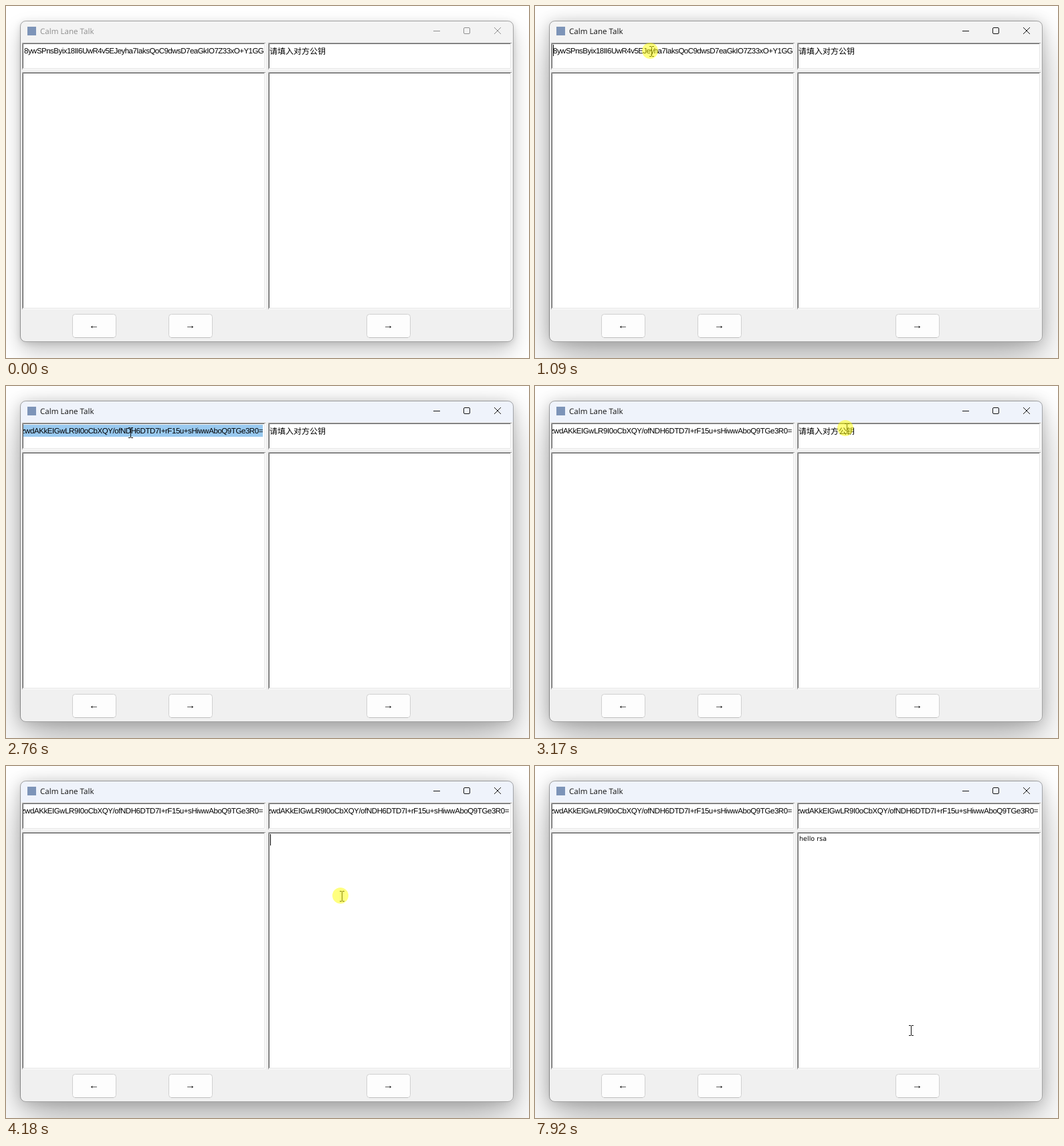
Recreate the animation shown at these times as an HTML page. Size 782x527 px, loop 7990 ms.

```html
<!DOCTYPE html>
<html lang="en">
<head>
<meta charset="utf-8">
<title>Chat window</title>
<style>
html, body { margin: 0; width: 100%; height: 100%; overflow: hidden; background: #fff; }
#stage { position: absolute; left: 0; top: 0; width: 782px; height: 527px; overflow: hidden; }
#shadow {
  position: absolute; left: 22px; top: 23px; width: 736px; height: 479px; border-radius: 8px;
  box-shadow: 0 16px 32px rgba(0,0,0,.22), 0 2px 11px rgba(0,0,0,.17);
}
#shadow.active { box-shadow: 0 32px 64px rgba(0,0,0,.28), 0 2px 21px rgba(0,0,0,.22); }
svg { position: absolute; left: 0; top: 0; }
text { white-space: pre; text-rendering: geometricPrecision; font-kerning: none; }
.key { font: 11.5px "Liberation Sans", Arial, sans-serif; }
.hint { font: 12px "Noto Sans CJK SC", "Noto Sans CJK", sans-serif; }
.typed { font: 9.6px "DejaVu Sans", Verdana, sans-serif; }
.arrow { font: 15px "Liberation Sans", Arial, sans-serif; text-anchor: middle; }
#caption { font: 11.6px "Open Sans", "Noto Sans", sans-serif; }
#chrome { color: #8f8f8f; }
#chrome.active { color: #141414; }
</style>
</head>
<body>
<div id="stage">
  <div id="shadow"></div>
  <svg width="782" height="527" viewBox="0 0 782 527">
    <defs>
      <clipPath id="frameClip"><rect x="22" y="23" width="737" height="480" rx="8"/></clipPath>
      <clipPath id="leftClip"><rect x="26" y="57" width="360" height="36"/></clipPath>
      <clipPath id="rightClip"><rect x="394" y="57" width="360" height="36"/></clipPath>
    </defs>
    <g clip-path="url(#frameClip)">
      <rect x="22" y="23" width="737" height="480" fill="#f0f0f0"/>
      <rect id="bar" x="22" y="23" width="737" height="31"/>
    </g>
    <rect x="21.5" y="22.5" width="737" height="480" rx="8" fill="none" stroke="#000" stroke-opacity=".32"/>
    <rect x="32" y="31" width="13" height="13" fill="#7d94b8"/>
    <g id="chrome">
      <text id="caption" x="51" y="42" fill="currentColor">Calm Lane Talk</text>
      <g fill="none" stroke="currentColor">
        <path d="M639 37.5h10"/>
        <rect x="684.5" y="32.5" width="9" height="9" rx="1.5"/>
        <path d="M730 32l10 10M740 32l-10 10"/>
      </g>
    </g>
    <g id="widgets"></g>
    <g clip-path="url(#leftClip)">
      <rect id="leftSel" x="26" y="58" width="358" height="18" fill="#99c9ef"/>
      <text id="keyHead" class="key" x="27" y="71" letter-spacing="-.52">8ywSPnsByix18II6UwR4v5EJeyha7IaksQoC9dwsD7eaGkIO7Z33xO+Y1GG</text>
      <text id="leftTail" class="key" x="384" y="71" text-anchor="end" letter-spacing="-.43"></text>
    </g>
    <g clip-path="url(#rightClip)">
      <rect id="rightSel" x="394" y="58" width="85" height="18" fill="#99c9ef"/>
      <text id="hint" class="hint" x="394" y="72">请填入对方公钥</text>
      <text id="rightTail" class="key" x="752" y="71" text-anchor="end" letter-spacing="-.43"></text>
    </g>
    <text id="typed" class="typed" x="395" y="112"></text>
    <rect id="caret" width="1"/>
    <g id="cursor">
      <path d="M-3 -7.5h3m1 0h3M-3 7.5h3m1 0h3M.5 -7v14" fill="none" stroke="#111"/>
      <circle id="press" cx="-2" cy="-1" r="12" fill="#ff0" fill-opacity=".5"/>
    </g>
  </svg>
</div>
<script>
const LOOP = 7990;
const TAIL = "zwdAKkEIGwLR9I0oCbXQY/ofNDH6DTD7I+rF15u+sHiwwAboQ9TGe3R0=";
const MESSAGE = "hello rsa";

// start, end, steps, from x, from y, to x, to y, sag
const MOVES = [
  [200, 890, 11, 664, 445, 174, 68, 0],
  [2690, 3170, 7, 186, 70, 466, 64, 15],
  [3770, 3980, 4, 470, 82, 502, 195, 0],
  [7850, 7920, 2, 539, 305, 562, 396, 0]
];
const PRESSES = [[1090, 1220], [1280, 1350], [3170, 3230], [3300, 3360], [4180, 4250]];
// time of each key and the caret position after it
const KEYS = [[5190, 401], [5320, 407], [5780, 410], [5920, 413], [6050, 419],
  [6320, 421], [6650, 425], [6850, 430], [7000, 436]];
// start, end, x, y, height
const CARETS = [
  [1090, 1280, 27, 58, 17],
  [3770, 4180, 752, 58, 17],
  [4180, 4660, 395, 102, 17],
  ...KEYS.map(([t, x], i) => [t, i + 1 < KEYS.length ? KEYS[i + 1][0] : 7460, x, 102, 13])
];

const $ = id => document.getElementById(id);
const within = (t, a, b) => t >= a && t < b;
const show = (id, on) => $(id).setAttribute("visibility", on ? "visible" : "hidden");
const set = (id, attrs) => {
  for (const name in attrs) $(id).setAttribute(name, attrs[name]);
};

function sunkenBox(x, y, w, h) {
  const edge = (d, colour) => `<path d="${d}" fill="none" stroke="${colour}"/>`;
  return `<rect x="${x}" y="${y}" width="${w}" height="${h}" fill="#fff"/>` +
    edge(`M${x + .5} ${y + h}V${y + .5}H${x + w}`, "#a0a0a0") +
    edge(`M${x + 1.5} ${y + h - 1}V${y + 1.5}H${x + w - 1}`, "#696969") +
    edge(`M${x + 1} ${y + h - 1.5}H${x + w - 1.5}V${y + 1}`, "#e3e3e3");
}

function button(x, arrow) {
  return `<rect x="${x + .5}" y="461.5" width="65" height="35" rx="4" fill="#fdfdfd" stroke="#d0d0d0"/>` +
    `<path d="M${x + 4} 496.5h58" stroke="#bdbdbd"/>` +
    `<text class="arrow" x="${x + 32.5}" y="483">${arrow}</text>`;
}

$("widgets").innerHTML =
  [24, 392].map(x => sunkenBox(x, 55, 364, 40) + sunkenBox(x, 99, 364, 355)).join("") +
  button(99, "←") + button(243, "→") + button(539, "→");
$("leftTail").textContent = $("rightTail").textContent = TAIL;

function cursorAt(t) {
  const move = MOVES.filter(m => t >= m[0]).pop();
  if (!move || within(t, 5190, 7850)) return null;
  const [a, b, n, x0, y0, x1, y1, sag] = move;
  const s = Math.min(1, Math.floor((t - a) / (b - a) * (n - 1) + 1e-6) / (n - 1));
  const u = s * (2 - s);
  return [Math.round(x0 + (x1 - x0) * u), Math.round(y0 + (y1 - y0) * u + 4 * sag * u * (1 - u))];
}

function draw(t) {
  const active = t >= 1090;
  $("shadow").classList.toggle("active", active);
  $("chrome").classList.toggle("active", active);
  set("bar", { fill: t < 1150 ? "#f3f3f3" : t < 1220 ? "#f1f3f7" : "#eff3fb" });

  show("keyHead", t < 1280);
  show("leftTail", t >= 1280);
  show("leftSel", within(t, 1280, 3170));
  show("hint", t < 3770);
  show("rightTail", t >= 3770);
  show("rightSel", within(t, 3300, 3770));

  const text = MESSAGE.slice(0, KEYS.filter(k => t >= k[0]).length);
  if ($("typed").textContent !== text) $("typed").textContent = text;

  const caret = CARETS.find(c => within(t, c[0], c[1]));
  show("caret", caret);
  if (caret) set("caret", { x: caret[2], y: caret[3], height: caret[4] });

  const at = cursorAt(t);
  set("cursor", { display: at ? "inline" : "none" });
  if (at) set("cursor", { transform: `translate(${at})` });
  show("press", PRESSES.some(p => within(t, ...p)));
}

const start = performance.now();
function tick() {
  draw((performance.now() - start) % LOOP);
  requestAnimationFrame(tick);
}
tick();
</script>
</body>
</html>
```
